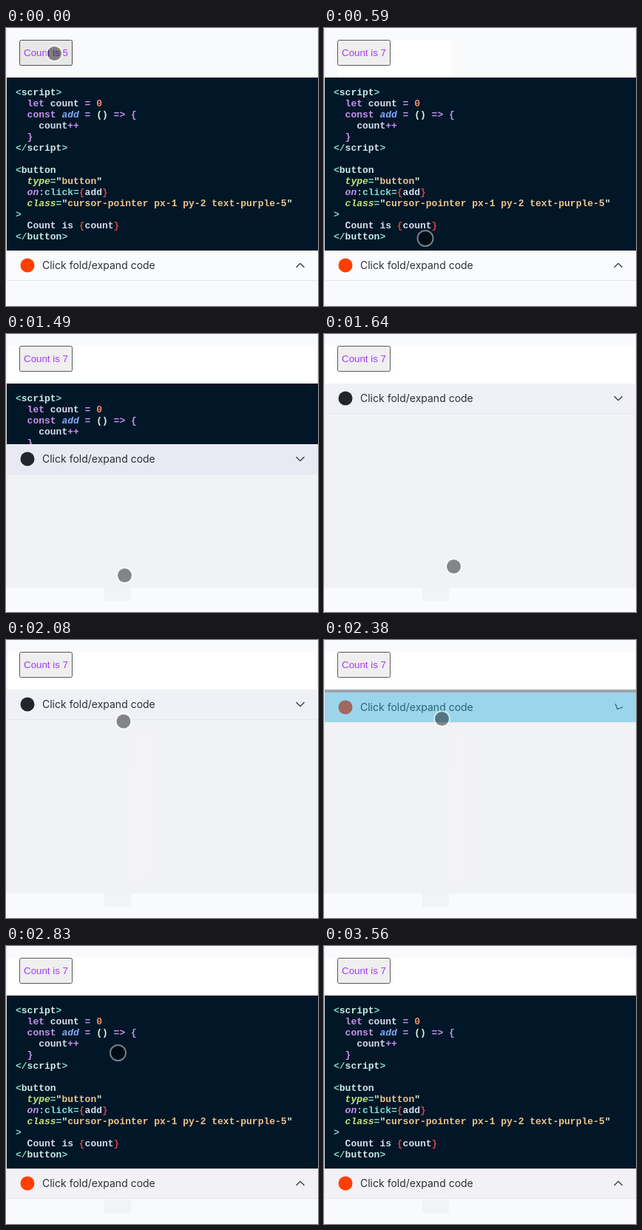
An HTML page with a canvas that plays this animation: 422 px wide and 376 px high, repeating every 4.76 s.

```html
<!DOCTYPE html>
<html lang="en">
<head>
<meta charset="utf-8">
<title>Fold and expand code</title>
<style>
  html, body { margin: 0; width: 100%; height: 100%; overflow: hidden; background: #f9fafc; }
  canvas { display: block; }
</style>
</head>
<body>
<canvas id="stage" width="422" height="376"></canvas>
<script>
const ctx = document.getElementById('stage').getContext('2d');
const LOOP = 4760;
const CODE_TOP = 67, BAR_OPEN = 301, BAR_HEIGHT = 41;

// Token style: colour and optional italic, chosen by the first letter of each token.
const STYLES = {
  t: ['#7fdbca'], n: ['#caece6'], k: ['#c792ea'], w: ['#d6deeb'],
  d: ['#f78c6c'], f: ['#82aaff', true], a: ['#c5e478', true],
  o: ['#c792ea', true], q: ['#d9f5dd'], s: ['#ecc48d'], r: ['#d3423e']
};
const CODE = [
  ['t<', 'nscript', 't>'],
  ['klet ', 'wcount ', 'k= ', 'd0'],
  ['kconst ', 'fadd', 'k = ', 'q() ', 'k=> {'],
  ['wcount', 'k++'],
  ['k}'],
  ['t</', 'nscript', 't>'],
  [],
  ['t<', 'nbutton'],
  ['atype', 't=', 'q"', 'sbutton', 'q"'],
  ['oon', 't:click=', 'r{', 'wadd', 'r}'],
  ['aclass', 't=', 'q"', 'scursor-pointer px-1 py-2 text-purple-5', 'q"'],
  ['t>'],
  ['wCount is ', 'r{', 'wcount', 'r}'],
  ['t</', 'nbutton', 't>']
];
const INDENTS = [0, 2, 2, 4, 2, 0, 0, 0, 2, 2, 2, 0, 2, 0];

// Pointer positions: start time, x, y.
const POINTER = [
  [0, 65.5, 34.5], [300, 107, 93], [440, 161, 234.5], [590, 137, 284.5],
  [740, 144.5, 292.5], [890, 155, 348], [1040, 158, 331.5], [1190, 160.5, 326.5],
  [1640, 175.5, 314.5], [1790, 185, 138], [1930, 106, 136.5], [2080, 159, 110],
  [2230, 159.5, 107.5], [2380, 159.5, 106.5], [2680, 160, 115], [2830, 151.5, 144.5],
  [2970, 125.5, 294.5], [3120, 130.5, 291], [3260, 193.5, 237.5], [3410, 233.5, 322.5]
];
const POINTER_END = 3560;

const IDLE = { top: BAR_OPEN, fill: '#fafbfc', logo: '#ff3e00', ink: '#2c2f36', angle: 180, alpha: 1 };
const TAP = { fill: '#9bd5ec', logo: '#a0685f', ink: '#2b6176' };
const BAR = [
  [0, {}],
  [1340, TAP],
  [1490, { top: 149, fill: '#e9e9f4', logo: '#22262c', angle: 0 }],
  [1640, { top: 67, fill: '#f0f1f6', logo: '#22262c', angle: 0 }],
  [2380, { ...TAP, top: 71, angle: 24, alpha: 0.35 }],
  [2530, { top: 256, fill: '#ebebf4', angle: 160 }],
  [2680, { fill: '#f2f1f6' }]
];
const BUTTON = [
  [0, { digit: 5, fill: '#e7e7e8', edge: '#4f4f4f' }],
  [150, { digit: 6, fill: '#f3f3f3', edge: '#6a6a6a' }],
  [300, { digit: 7, fill: '#f3f3f3', edge: '#6a6a6a' }],
  [440, { digit: 7, fill: '#efefef', edge: '#5a5a5a' }]
];

const at = (steps, t) => steps.findLast(step => step[0] <= t);

function rect(fill, x, y, w, h) {
  ctx.fillStyle = fill;
  ctx.fillRect(x, y, w, h);
}

function roundRect(fill, x, y, w, h, r) {
  ctx.fillStyle = fill;
  ctx.beginPath();
  ctx.roundRect(x, y, w, h, r);
  ctx.fill();
}

function disc(fill, x, y, r) {
  ctx.fillStyle = fill;
  ctx.beginPath();
  ctx.arc(x, y, r, 0, Math.PI * 2);
  ctx.fill();
}

function text(value, x, y, font, fill) {
  ctx.font = font;
  ctx.fillStyle = fill;
  ctx.fillText(value, x, y);
}

function drawBackdrop(t) {
  rect('#f9fafc', 0, 0, 422, 376);
  if (t >= 1340) rect('#fff', 1, 16, 421, 51);
  else if (t >= 440) rect('#fff', 18, 16, 154, 51);
  if (t >= 1490 && t < 2680) rect('#f1f2f5', 0, CODE_TOP, 422, 276);
  if (t >= 890) rect('#f2f3f5', 133, 343, t < 1040 ? 33 : 36, 18);
  if (t >= 1790 && t < 2680) {
    roundRect('#f3f3f5', 172, 122, 24, 70, 9);
    roundRect('#f3f3f5', 164, 170, 32, 158, 9);
  }
  rect('#ebecee', 0, 0, 1.5, 341);
  rect('#ebecee', 421, 0, 1, 341);
}

function drawButton({ digit, fill, edge }) {
  roundRect(fill, 18, 16, 72, 35, 2.5);
  ctx.strokeStyle = edge;
  ctx.lineWidth = 1;
  ctx.beginPath();
  ctx.roundRect(18.5, 16.5, 71, 34, 2);
  ctx.stroke();
  text('Count is ' + digit, 24, 38, '13.333px "Liberation Sans", Arial, sans-serif', '#a33cf4');
}

function drawCode({ top, alpha }) {
  ctx.save();
  ctx.beginPath();
  ctx.rect(1, CODE_TOP, 421, top - CODE_TOP);
  ctx.clip();
  ctx.globalAlpha = alpha;
  rect('#011627', 1, CODE_TOP, 421, BAR_OPEN - CODE_TOP);
  CODE.forEach((line, row) => {
    let x = 13 + INDENTS[row] * 7.8;
    for (const token of line) {
      const [color, italic] = STYLES[token[0]];
      const value = token.slice(1);
      text(value, x, 91 + row * 15,
        (italic ? 'italic ' : '') + 'bold 13px "Liberation Mono", "Courier New", monospace', color);
      x += ctx.measureText(value).width;
    }
  });
  ctx.restore();
}

function drawBar({ top, fill, logo, ink, angle }) {
  const middle = top + 20;
  rect(fill, 1, top, 421, BAR_HEIGHT - 1);
  rect('#e6e7ea', 1, top + BAR_HEIGHT - 1, 421, 1);
  disc(logo, 29, middle, 9.5);
  text('Click fold/expand code', 49, middle + 5, '14px Inter, sans-serif', ink);

  ctx.save();
  ctx.translate(398, middle);
  ctx.rotate(angle * Math.PI / 180);
  ctx.strokeStyle = ink;
  ctx.lineWidth = 1.2;
  ctx.beginPath();
  ctx.moveTo(-5.5, -2.75);
  ctx.lineTo(0, 2.75);
  ctx.lineTo(5.5, -2.75);
  ctx.stroke();
  ctx.restore();
}

function drawPointer(t) {
  if (t >= POINTER_END) return;
  const [, x, y] = at(POINTER, t);
  disc('rgba(0,0,0,0.45)', x, y, 9.5);
  ctx.strokeStyle = 'rgba(255,255,255,0.45)';
  ctx.lineWidth = 2;
  ctx.beginPath();
  ctx.arc(x, y, 10.5, 0, Math.PI * 2);
  ctx.stroke();
}

function draw(t) {
  const bar = { ...IDLE, ...at(BAR, t)[1] };
  drawBackdrop(t);
  drawButton(at(BUTTON, t)[1]);
  drawCode(bar);
  drawBar(bar);
  drawPointer(t);
}

const start = performance.now();
function tick() {
  draw((performance.now() - start) % LOOP);
  requestAnimationFrame(tick);
}
tick();
</script>
</body>
</html>
```
